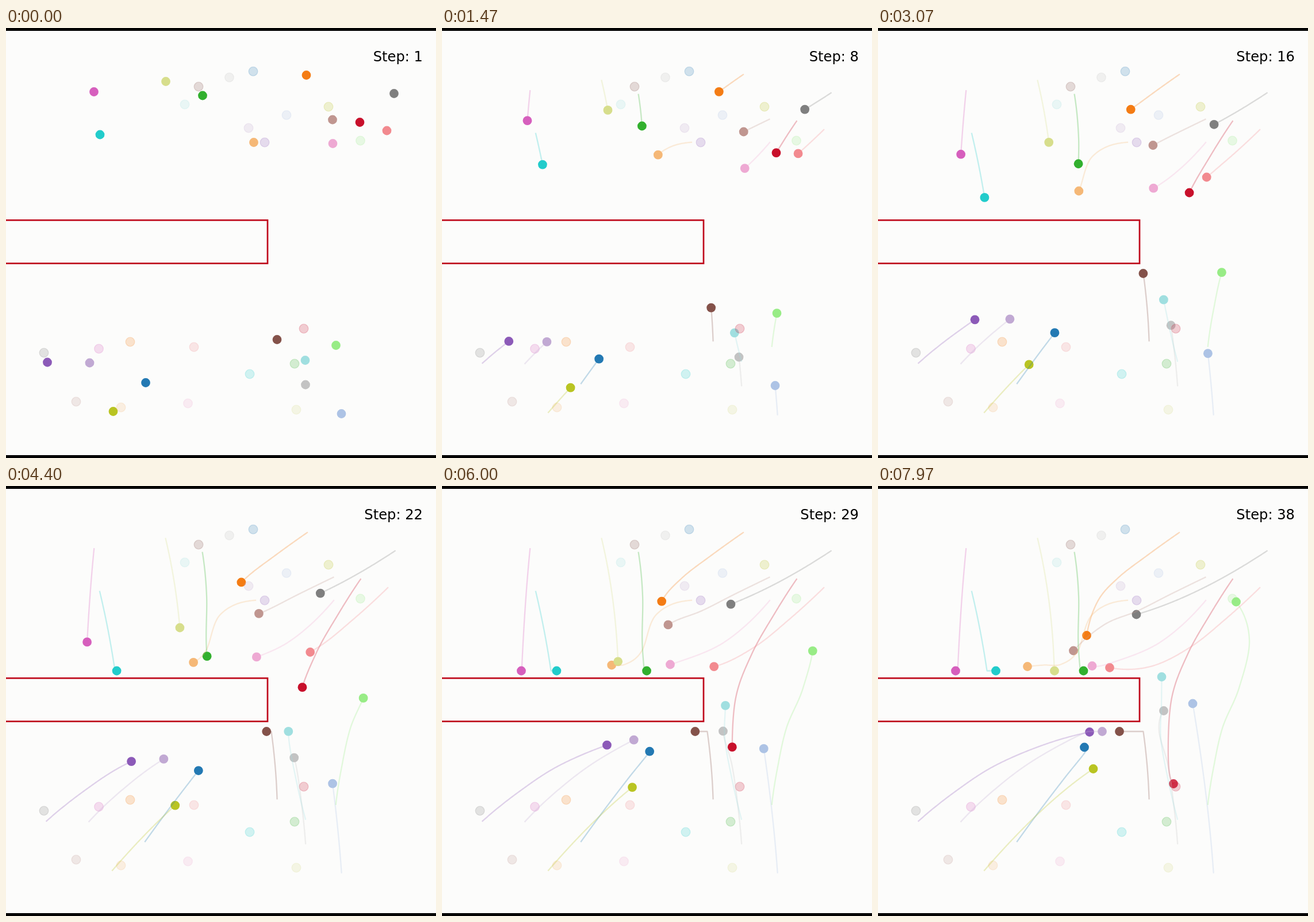
These frames come from a looping animation (748x748 px, 8000 ms). An HTML page with a canvas:

```html
<!DOCTYPE html>
<html lang="en">
<head>
<meta charset="utf-8">
<style>
  html, body { margin: 0; width: 100%; height: 100%; overflow: hidden; background: #fcfcfb; }
  canvas { display: block; }
</style>
</head>
<body>
<canvas id="stage" width="748" height="748"></canvas>
<script>
const ctx = document.getElementById('stage').getContext('2d');
const LOOP = 8000, END = 7970, FRAME = 100 / 3, TRAIL_START = -85, STEP = 215.41;
const WALL = { top: 321.5, bottom: 427, right: 465 };
const agents = [];

// The path points are passed at equal intervals from 0 to END.
// Points may lie inside the wall: the agent then slides along it.
function agent(color, goal, ...path) {
  const n = path.length;
  const ghost = (a, b, c) => a.map((v, axis) => 3 * v - 3 * b[axis] + c[axis]);
  const points = [ghost(...path), ...path, ghost(path[n - 1], path[n - 2], path[n - 3])];
  agents.push({ color, goal, points, above: path[0][1] < WALL.top });
}

agent('#2379b3', [430, 75.5], [243, 617], [284, 561], [326.5, 505.5], [361, 462], [359, 454.5]);
agent('#adc3e5', [488, 151.5], [583.5, 671], [570, 533], [547.5, 378.5]);
agent('#f47c14', [216, 546], [522.5, 82], [468, 121], [418, 159.5], [382.5, 200], [363, 260]);
agent('#f5b877', [200, 660], [431, 199], [372.5, 224], [347.5, 287], [319, 310], [288, 311.5], [260, 314]);
agent('#32b02e', [502, 584], [342, 117.5], [349, 191], [348.5, 277], [356, 371], [357.5, 460]);
agent('#98ec86', [616.5, 196], [574, 552], [583.5, 491], [599.5, 420], [628, 351.5], [646, 268], [623, 201.5]);
agent('#c8102b', [518, 523], [615.5, 164], [578.5, 222], [539, 292], [510.5, 371], [505, 475], [514, 518]);
agent('#f28a8f', [327, 555], [662.5, 178.5], [604, 232], [543, 280.5], [474, 314], [403, 316]);
agent('#8c5ab8', [450, 199], [72, 581.5], [133, 532.5], [201.5, 487.5], [286, 451], [368, 428]);
agent('#c1a9d3', [422, 174], [145.5, 582.5], [197, 533], [259.5, 484.5], [333, 442], [390, 418]);
agent('#84524a', [335, 102], [471.5, 542], [456, 392], [420, 243]);
agent('#c09690', [122, 650], [568, 159.5], [509.5, 188], [452, 217], [394, 241], [340, 286.5]);
agent('#d65fbd', [161.5, 558], [153, 111], [142, 255], [135, 424]);
agent('#eea9d3', [316.5, 653], [568.5, 201], [492, 271], [411, 306], [372.5, 313]);
agent('#7f7f7f', [66, 565], [675, 114], [558.5, 181], [449.5, 223.5]);
agent('#c3c3c3', [388.5, 86], [521, 620.5], [514.5, 555], [504.5, 486], [489, 427], [497, 391]);
agent('#b9c422', [561, 137], [186.5, 667], [284.5, 564.5], [374.5, 492]);
agent('#d7de8c', [505, 664], [278, 93], [301, 231.5], [307, 380]);
agent('#22cccb', [424, 602], [163.5, 185.5], [190.5, 328], [205, 475]);
agent('#a0dfe0', [311, 133], [520.5, 578], [505, 512.5], [492, 440], [493, 382.5], [493.5, 332]);

// Catmull-Rom curve through the path, kept outside the wall.
function position({ points, above }, t) {
  const last = points.length - 3;
  const s = t / END * last;
  const i = Math.max(0, Math.min(last - 1, Math.floor(s)));
  const u = s - i;
  const [a, b, c, d] = points.slice(i, i + 4);
  const [x, y] = b.map((v, axis) => {
    const p = a[axis], q = c[axis], r = d[axis];
    return v + u / 2 * (q - p + u * (2 * p - 5 * v + 4 * q - r + u * (3 * (v - q) + r - p)));
  });
  if (x > WALL.right) return [x, y];
  return [x, above ? Math.min(y, WALL.top) : Math.max(y, WALL.bottom)];
}

function disc([x, y], radius) {
  ctx.beginPath();
  ctx.arc(x, y, radius, 0, 2 * Math.PI);
  ctx.fill();
}

function drawDot(agent, t) {
  const [x, y] = position(agent, t);
  const arrived = Math.hypot(x - agent.goal[0], y - agent.goal[1]) < 8;
  ctx.fillStyle = agent.color;
  ctx.globalAlpha = arrived ? 0.83 : 1;
  disc([x, y], 7.9);
}

function drawGoal({ color, goal }) {
  ctx.fillStyle = ctx.strokeStyle = color;
  ctx.lineWidth = 1.3;
  ctx.globalAlpha = 0.2;
  disc(goal, 7.8);
  ctx.stroke();
}

function drawTrail(agent, t) {
  ctx.strokeStyle = agent.color;
  ctx.lineWidth = 2.3;
  ctx.globalAlpha = 0.27;
  ctx.beginPath();
  for (let s = TRAIL_START; s < t; s += 40) ctx.lineTo(...position(agent, s));
  ctx.lineTo(...position(agent, t));
  ctx.stroke();
}

function draw(t) {
  ctx.fillStyle = '#fcfcfb';
  ctx.fillRect(0, 0, 748, 748);
  ctx.lineJoin = 'round';
  agents.forEach(a => drawDot(a, t));
  agents.forEach(drawGoal);
  agents.forEach(a => drawTrail(a, t));
  ctx.globalAlpha = 1;

  ctx.lineJoin = 'miter';
  ctx.strokeStyle = '#bf0a1c';
  ctx.lineWidth = 2.7;
  ctx.strokeRect(-10, 334.3, 465, 75.2);

  ctx.fillStyle = '#000';
  ctx.fillRect(0, 0, 748, 5);
  ctx.fillRect(0, 743, 748, 5);
  ctx.font = '24.2px "DejaVu Sans", sans-serif';
  ctx.textAlign = 'right';
  ctx.fillText('Step: ' + (2 + Math.floor((t - 0.1) / STEP)), 725, 58);
}

function tick() {
  const frame = Math.min(239, Math.floor((performance.now() % LOOP + 3.4) / FRAME));
  draw(Math.round(frame * FRAME / 10) * 10);
  requestAnimationFrame(tick);
}
tick();
</script>
</body>
</html>
```
